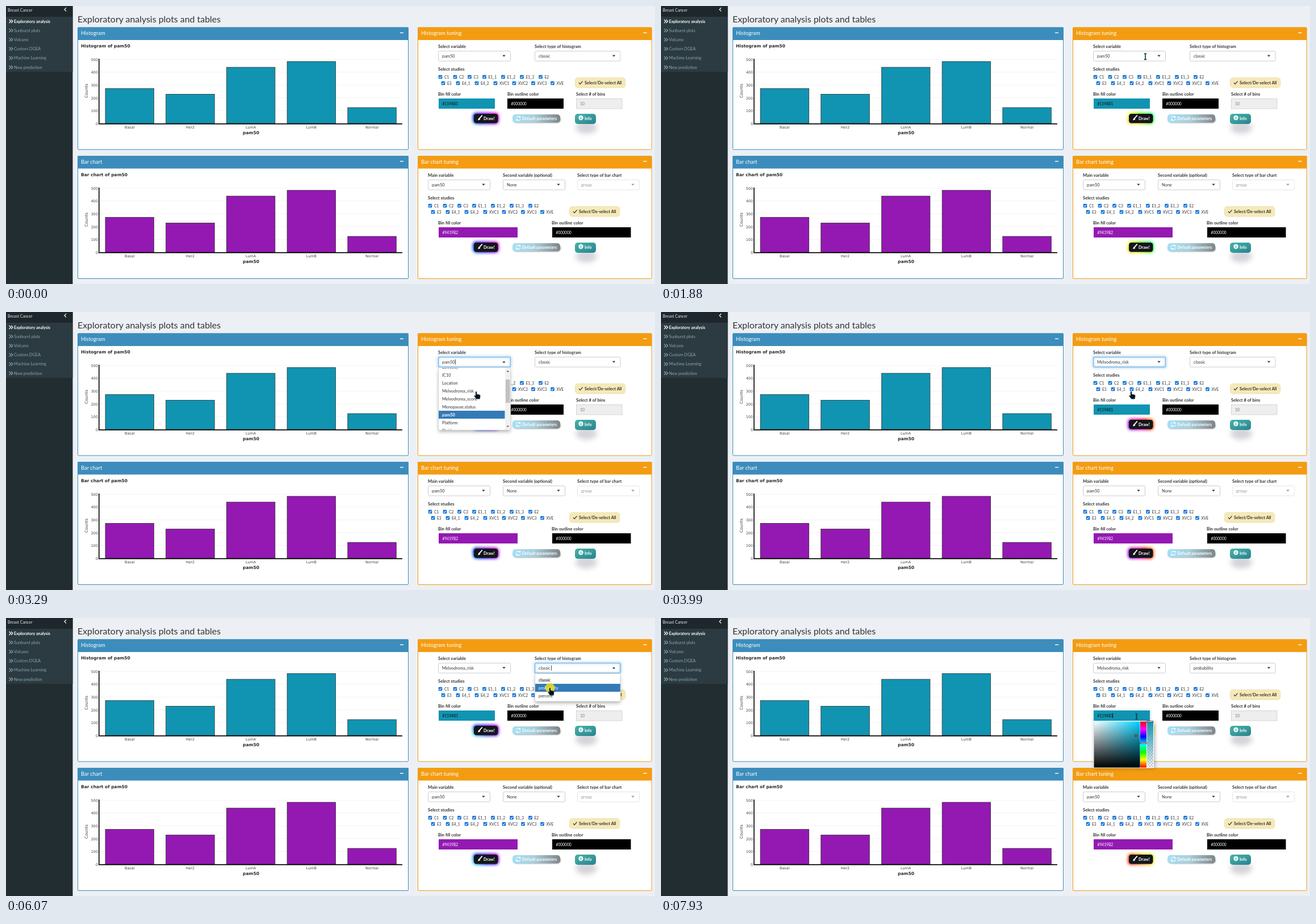
An HTML page for the animation above (7.99 s loop, 1143x490 px).

```html
<!DOCTYPE html>
<html lang="en">
<head>
<meta charset="utf-8">
<title>Exploratory analysis</title>
<style>
html, body { margin: 0; width: 100%; height: 100%; overflow: hidden; background: #ecf0f5; }
svg { position: absolute; left: 0; top: 0; width: 1143px; height: 490px; font-family: Lato, sans-serif; }
.plot { font-family: "DejaVu Sans", sans-serif; }
.glow {
  position: absolute; left: 822px; width: 46px; height: 20px; border-radius: 6px; filter: blur(2.6px);
  background: linear-gradient(45deg, #ff0000, #ff7300, #fffb00, #48ff00, #00ffd5, #002bff, #7a00ff, #ff00c8, #ff0000);
  background-size: 400%;
  animation: glow 7.99s linear infinite;
}
/* the colour band runs left, then turns back */
@keyframes glow {
  0% { background-position: 253.9px 0; }
  57.57% { background-position: 0 0; }
  100% { background-position: 187.1px 0; }
}
</style>
</head>
<body>
<svg id="page" viewBox="0 0 1143 490"></svg>
<div class="glow" style="top:188px"></div>
<div class="glow" style="top:415px"></div>
<svg id="top" viewBox="0 0 1143 490"></svg>
<script>
const LOOP = 7990, STEP = 227;
const INK = '#333', LINE = '#ccc', BLUE = '#337ab7';

const rect = (x, y, w, h, fill, more = '') =>
  `<rect x="${x}" y="${y}" width="${w}" height="${h}" fill="${fill}" ${more}/>`;
const path = (d, stroke, width = 1, more = '') =>
  `<path d="${d}" fill="none" stroke="${stroke}" stroke-width="${width}" ${more}/>`;
// y is the middle of the capitals
const text = (x, y, size, str, fill = INK, more = '') =>
  `<text x="${x}" y="${y + size * 0.36}" font-size="${size}" fill="${fill}" ${more}>${str}</text>`;
const bold = (x, y, str, size = 7.6, fill = INK) => text(x, y, size, str, fill, 'font-weight="700"');
const group = (id, body) => `<g id="${id}">${body}</g>`;
const times = (list, fn) => list.map(fn).join('');

function sidebar() {
  const items = ['Exploratory analysis', 'Sunburst plots', 'Volcano', 'Custom DGEA', 'Machine Learning', 'New prediction'];
  return rect(0, 0, 117.5, 490, '#222d32') + rect(0, 0, 117.5, 19, '#1e282c') + rect(0, 19, 117.5, 97, '#2c3b41') +
    text(3, 7, 7.1, 'Breast Cancer', '#e4eaec') + path('M106 3l-3 3.2l3 3.2', '#fff', 1.2) +
    times(items, (name, i) => {
      const y = 27 + i * 16.2, color = i ? '#8aa4af' : '#fff';
      return path(`M5.5 ${y - 3}l3 3l-3 3M9 ${y - 3}l3 3l-3 3`, color, 1.2) +
        text(14, y, i ? 7.35 : 7.2, name, color, i ? '' : 'font-weight="700"');
    });
}

function panel(x, y, w, h, color, title) {
  return rect(x + .5, y + .5, w - 1, h - 1, '#fff', `stroke="${color}" rx="1.5"`) +
    rect(x, y, w, 22.5, color, 'rx="1.5"') + text(x + 6, y + 10.5, 9.4, title, '#fff') +
    rect(x + w - 15, y + 9, 6, 1.4, '#fff');
}

function chart(dy, color, title) {
  const bars = [['Basal', 273], ['Her2', 229], ['LumA', 439], ['LumB', 484], ['Normal', 124]];
  const base = 207 + dy, mid = 'text-anchor="middle"', scale = 0.2255;
  return `<g class="plot">` + bold(132, 70 + dy, title, 7.55, '#2a2a2a') +
    times([0, 1, 2, 3, 4, 5], i => {
      const y = base - i * 100 * scale;
      return rect(164, y - .5, 533, .8, '#f0f0f0') + text(162, y + .3, 6.4, i * 100, '#444', 'text-anchor="end"');
    }) +
    times(bars, ([name, n], i) => {
      const x = 175 + i * 106.7;
      return rect(x, base - n * scale, 85.5, n * scale, color, 'stroke="#222" stroke-width=".7"') +
        text(x + 42.7, base + 6.7, 6.4, name, '#444', mid);
    }) +
    rect(163, base - 114, 1.6, 115, '#000') + rect(163, base - .1, 535, 1.7, '#000') +
    text(431.5, base + 16, 7.6, 'pam50', '#2a2a2a', mid + ' font-weight="700"') +
    `<g transform="translate(141 ${149.5 + dy}) rotate(-90)">${text(0, 0, 7.2, 'Counts', '#444', mid)}</g></g>`;
}

const arrowDown = (x, y) => `<path d="M${x - 2.7} ${y - 1.4}h5.4l-2.7 3z" fill="#333"/>`;
const arrowUp = (x, y) => `<path d="M${x - 2.7} ${y + 1.2}h5.4l-2.7 -3z" fill="#333"/>`;
const select = (x, y, w, value, more = '') =>
  `<g ${more}>` + rect(x + .5, y + .5, w - 1, 17.5, '#fff', `rx="2" stroke="${LINE}"`) +
  text(x + 7, y + 9.3, 7.4, value) + arrowDown(x + w - 12, y + 9) + '</g>';
const field = (x, y, w, color, value, ink) => rect(x, y, w, 18, color) + text(x + 6.5, y + 9.3, 6.7, value, ink);

function checks(dx, dy) {
  const rows = [
    [125, [765, 791, 816.5, 842.5, 875.5, 908.5, 941.5], ['C1', 'C2', 'C3', 'E1_1', 'E1_2', 'E1_3', 'E2']],
    [136, [770, 796, 829, 862, 895, 928.5, 962.5], ['E3', 'E4_1', 'E4_2', 'XVC1', 'XVC2', 'XVC3', 'XVE']]
  ];
  return times(rows, ([y, xs, names]) => times(xs, (x, i) =>
    rect(x + dx - 3.3, y + dy - 3.3, 6.6, 6.6, '#0a6fd6', 'rx="1"') +
    path(`M${x + dx - 1.9} ${y + dy}l1.4 1.5l2.5 -3`, '#fff', 1.1) +
    text(x + dx + 7, y + dy + .2, 6.7, names[i])));
}

const allButton = (x, y) =>
  rect(x + .4, y + .4, 88.5, 17.6, '#f6e9b8', 'rx="5" stroke="#eadca4" stroke-width=".8"') +
  path(`M${x + 7} ${y + 9.3}l2.2 2.3l4.3 -5`, INK, 1.3) + bold(x + 17, y + 9.3, 'Select/De-select All', 7.4);

function sideButtons(dy) {
  const y = 198 + dy;
  return rect(893, y - 4, 84, 12, '#555', 'rx="6" opacity=".55" filter="url(#soft)"') +
    rect(892, y - 7, 84, 14.5, 'url(#ice)', 'rx="5"') +
    path(`M898.5 ${y - .5}a3.6 3.6 0 0 1 6.5 -1.6m.5 -2v2.4h-2.4M906 ${y + .7}a3.6 3.6 0 0 1 -6.5 1.6m-.5 2v-2.4h2.4`, '#fff', 1.2) +
    bold(909, y + .4, 'Default parameters', 7.1, '#fff') +
    `<ellipse cx="1022" cy="${y + 16}" rx="19" ry="11" fill="#667" opacity=".28" filter="url(#wide)"/>` +
    rect(1002, y - 8, 37, 18, 'url(#sea)', 'rx="5"') +
    `<circle cx="1012.5" cy="${y - 1}" r="4.2" fill="#fff"/>` + rect(1011.9, y - 1.6, 1.3, 3.2, '#2f9299') +
    rect(1011.9, y - 3.5, 1.3, 1.2, '#2f9299') + bold(1019, y + .6, 'Info', 7.2, '#fff');
}

function drawButton(dy) {
  const y = 198 + dy;
  return rect(824, y - 8, 42.5, 16.5, '#14151a', 'rx="4.5"') +
    path(`M838.3 ${y - 5}l-4 4.6`, '#fff', 1.9, 'stroke-linecap="round"') +
    `<path d="M833.6 ${y - .8}l1.7 1.6q.3 2.8 -4.8 2.4q1.6 -.7 1.2 -2.3q.3 -1.6 1.9 -1.7z" fill="#fff"/>` +
    bold(841, y + .2, 'Draw!', 7.3, '#fff');
}

const softDefs = `<defs>
  <filter id="soft" x="-20%" y="-60%" width="140%" height="220%"><feGaussianBlur stdDeviation="1.3"/></filter>
  <filter id="wide" x="-60%" y="-100%" width="220%" height="300%"><feGaussianBlur stdDeviation="5"/></filter>
  <linearGradient id="ice"><stop stop-color="#a5e0f4"/><stop offset=".45" stop-color="#a9cfdc"/><stop offset="1" stop-color="#7f8589"/></linearGradient>
  <linearGradient id="sea" x2="1" y2="1"><stop stop-color="#45b5a8"/><stop offset="1" stop-color="#28828f"/></linearGradient>
</defs>`;

page.innerHTML = softDefs + sidebar() +
  text(126, 23.5, 15.9, 'Exploratory analysis plots and tables') +
  panel(126, 37.5, 583, 216, '#3c8dbc', 'Histogram') + panel(126, 264, 583, 217, '#3c8dbc', 'Bar chart') +
  panel(725, 37.5, 412.5, 216, '#f39c12', 'Histogram tuning') + panel(725, 264, 412.5, 217, '#f39c12', 'Bar chart tuning') +
  chart(0, '#1194b1', 'Histogram of pam50') + chart(STEP, '#9419b2', 'Bar chart of pam50') +

  bold(761, 71, 'Select variable') + select(761, 79, 128, 'pam50') +
  bold(931, 71, 'Select type of histogram') + select(931, 79, 151.5, 'classic') +
  bold(761, 111, 'Select studies') + checks(0, 0) + allButton(1002, 126) +
  bold(761, 155, 'Bin fill color') + field(762, 163, 99, '#1194b1', '#1194B1', '#111') +
  bold(883, 155, 'Bin outline color') + field(883, 163, 99, '#000', '#000000', '#fff') +
  bold(1004, 155, 'Select # of bins') + rect(1004.5, 163.5, 80.5, 17.5, '#eee', `stroke="${LINE}" stroke-width=".8"`) +
  text(1011, 172.3, 6.8, '10', '#777') +

  bold(743, 298, 'Main variable') + select(743, 306, 110, 'pam50') +
  bold(875, 298, 'Second variable (optional)') + select(875, 306, 110, 'None') +
  bold(1006, 298, 'Select type of bar chart') + select(1006, 306, 110, 'group', 'opacity=".5"') +
  bold(743, 338, 'Select studies') + checks(-18, STEP) + allButton(992, 353) +
  bold(761, 382, 'Bin fill color') + field(762, 390, 139, '#9419b2', '#9419B2', '#fff') +
  bold(961, 382, 'Bin outline color') + field(962, 390, 138.5, '#000', '#000000', '#fff') +
  sideButtons(0) + sideButtons(STEP);

// Moving layer
const focus = (x, w) =>
  rect(x, 79, w, 18.5, 'none', 'rx="2.5" stroke="#66afe9" stroke-width="3" opacity=".55" filter="url(#halo)"') +
  rect(x + .5, 79.5, w - 1, 17.5, 'none', 'rx="2" stroke="#66afe9"');
const chosen = (x, w, value) => rect(x + 3, 81, w - 20, 14, '#fff') + text(x + 7, 88.3, 7.4, value);
const opened = (x, w, caret) => rect(x + w - 16, 84, 8, 8, '#fff') + arrowUp(x + w - 12, 88) + rect(caret, 83.5, .8, 9, '#222');
const sheet = (x, w, h) =>
  rect(x + 1, 103, w - 2, h - 2, '#000', 'opacity=".3" filter="url(#drop)"') +
  rect(x + .5, 98, w - 1, h, '#fff', `stroke="${LINE}" stroke-width=".8"`);
const option = (x, y, w, name, on, strong) =>
  rect(x + 1, y - 7, w, 14, on ? BLUE : '#fff') +
  text(x + 7, y, 7.4, name, on ? '#fff' : INK, strong ? 'font-weight="700"' : '');

const names = ['Ethnicity', 'IC10', 'Location', 'Melvodroma_risk', 'Melvodroma_score', 'Menopause.status', 'pam50', 'Platform', 'Ploidy'];
const row = i => 97 + i * 14;
const list1 = sheet(761, 128, 110) +
  `<g clip-path="url(#view)">` + times(names, (n, i) => option(761, row(i), 116.5, n, i === 6, i === 6)) +
  group('hover1', option(761, row(6), 116.5, names[6], false, true) + option(761, row(3), 116.5, names[3], true)) + '</g>' +
  rect(879, 98.5, 9.3, 109, '#f1f1f1') + rect(880, 119, 7.4, 41, '#c1c1c1') +
  `<path d="M881.5 105.5h4.4l-2.2 -2.6zM881.5 200.5h4.4l-2.2 2.6z" fill="#505050"/>` + opened(761, 128, 791);

const list2 = sheet(931, 151.5, 49) + option(931, 109, 149.8, 'classic', true, true) +
  option(931, 123, 149.8, 'probability') + option(931, 137, 149.8, 'percent') +
  group('hover2', option(931, 109, 149.8, 'classic', false, true) + option(931, 123, 149.8, 'probability', true)) +
  opened(931, 151.5, 960);

const picker = rect(762, 163, 99, 18, 'none', 'stroke="#66afe9" stroke-width="2" opacity=".6" filter="url(#halo)"') +
  field(762, 163, 99, '#1194b1', '#1194B1', '#111') + rect(795.3, 167.5, .8, 9, '#111') +
  rect(763, 184, 107, 81, '#000', 'opacity=".3" filter="url(#drop)"') + rect(761.5, 181.5, 106.5, 83, '#fff') +
  rect(762.5, 182.5, 81, 81, '#00d0ff') + rect(762.5, 182.5, 81, 81, 'url(#pale)') + rect(762.5, 182.5, 81, 81, 'url(#dark)') +
  rect(844, 182.5, 11, 81, 'url(#hue)') + rect(855.8, 182.5, 11.2, 81, 'url(#grid)') + rect(855.8, 182.5, 11.2, 81, 'url(#fade)') +
  `<circle cx="836.7" cy="207.6" r="2.8" fill="#0e7d96" stroke="#fff" stroke-width="2"/><circle cx="836.7" cy="207.6" r="2.8" fill="none" stroke="#000" stroke-width="1.2"/>` +
  rect(844, 219.3, 11, 2, '#fff', 'stroke="#000" stroke-width=".7"') +
  rect(855.8, 181.8, 11, 2, '#fff', 'stroke="#000" stroke-width=".7"');

const stops = list => times(list, (c, i) => `<stop offset="${i / (list.length - 1)}" stop-color="${c}"/>`);
const fadeStops = (c, a, b) => `<stop stop-color="${c}" stop-opacity="${a}"/><stop offset="1" stop-color="${c}" stop-opacity="${b}"/>`;
const topDefs = `<defs>
  <filter id="halo" x="-10%" y="-60%" width="120%" height="220%"><feGaussianBlur stdDeviation="2"/></filter>
  <filter id="drop" x="-20%" y="-40%" width="140%" height="180%"><feGaussianBlur stdDeviation="3.2"/></filter>
  <clipPath id="view"><rect x="761" y="98.5" width="118" height="109"/></clipPath>
  <linearGradient id="pale">${fadeStops('#fff', 1, 0)}</linearGradient>
  <linearGradient id="dark" x2="0" y2="1">${fadeStops('#000', 0, 1)}</linearGradient>
  <linearGradient id="fade" x2="0" y2="1">${fadeStops('#1194b1', 1, 0)}</linearGradient>
  <linearGradient id="hue" x2="0" y2="1">${stops(['#f00', '#f0f', '#00f', '#0ff', '#0f0', '#ff0', '#f00'])}</linearGradient>
  <pattern id="grid" width="5.6" height="5.6" patternUnits="userSpaceOnUse"><path d="M0 0h5.6v5.6h-5.6z" fill="#fff"/><path d="M0 0h2.8v5.6h2.8v-2.8h-5.6z" fill="#ccc"/></pattern>
</defs>`;

const beam = 'M-2.2 -5.2q2.2 0 2.2 1.2v8q0 1.2 -2.2 1.2M2.2 -5.2q-2.2 0 -2.2 1.2v8q0 1.2 2.2 1.2';
const cursor =
  group('click', '<circle r="8.5" fill="#f6e21c" opacity=".8"/>') +
  group('arrow', '<path d="M0 0v10.6l2.4 -2.1l1.6 3.6l1.8 -.8l-1.6 -3.5l3.3 -.2z" fill="#0a1518" stroke="#2f6d74" stroke-width=".5"/>') +
  group('hand', '<path d="M-1 .8q1 -1.5 2 0v4l5.2 1.2q1.2 .4 1 2l-.8 5.2h-6l-4 -5.2q.4 -1.6 1.8 -.6l.8 .8z" fill="#07131a" stroke="#2f5d74" stroke-width=".5"/>') +
  group('beam', path(beam, '#0f4a4c', 1.7)) + group('thin', path(beam, '#123', .9));

document.getElementById('top').innerHTML = topDefs + drawButton(0) + drawButton(STEP) +
  group('chosen1', chosen(761, 128, 'Melvodroma_risk')) + group('chosen2', chosen(931, 151.5, 'probability')) +
  group('focus1', focus(761, 128)) + group('focus2', focus(931, 151.5)) +
  group('list1', list1) + group('list2', list2) +
  group('caret', rect(795.3, 167.5, .8, 9, '#111')) + group('picker', picker) + group('cursor', cursor);

const pct = ms => (ms / LOOP * 100).toFixed(3) + '%';
const rules = [];
// visible only inside the given [from, to] spans
function show(id, ...spans) {
  const keys = times(spans, ([a, b]) => `${pct(a)}{opacity:1}${pct(b)}{opacity:0}`);
  rules.push(`@keyframes ${id}{0%{opacity:0}${keys}}#${id}{opacity:0;animation:${id} ${LOOP}ms step-end infinite}`);
}
function travel(id, stopsAt) {
  const keys = times(stopsAt, ([ms, x, y]) =>
    `${pct(ms)}{transform:translate(${x}px,${y}px);animation-timing-function:${ms < 1600 ? 'linear' : 'ease-in-out'}}`);
  rules.push(`@keyframes ${id}{${keys}}#${id}{animation:${id} ${LOOP}ms infinite}`);
}

show('focus1', [2080, 5080]);
show('list1', [2080, 3570]);
show('hover1', [3430, 3570]);
show('chosen1', [3570, LOOP]);
show('focus2', [5080, 7470]);
show('list2', [5080, 6130]);
show('hover2', [5920, 6130]);
show('chosen2', [6130, LOOP]);
show('caret', [7470, LOOP]);
show('picker', [7580, LOOP]);

show('arrow', [70, 1650], [4300, 4850], [6500, 7250]);
show('beam', [1650, 2800], [4850, 5550]);
show('hand', [2800, 4300], [5550, 6500]);
show('thin', [7250, LOOP]);
show('click', [2080, 2300], [3500, 3700], [5080, 5300], [6060, 6260], [7430, 7600]);
travel('cursor', [
  [0, 1103, 500], [100, 1098, 486], [830, 933, 270], [1110, 873.5, 182], [1670, 852, 95], [1900, 853, 89],
  [2650, 853, 89], [3300, 828, 140], [4190, 828, 140], [5000, 997, 88], [5100, 995, 88], [5400, 995, 88],
  [5850, 958, 123], [6250, 958, 123], [6910, 925, 135], [7350, 837.5, 173.5], [LOOP, 837.5, 173.5]
]);

const sheetEl = document.createElement('style');
sheetEl.textContent = rules.join('\n');
document.head.append(sheetEl);
</script>
</body>
</html>
```
